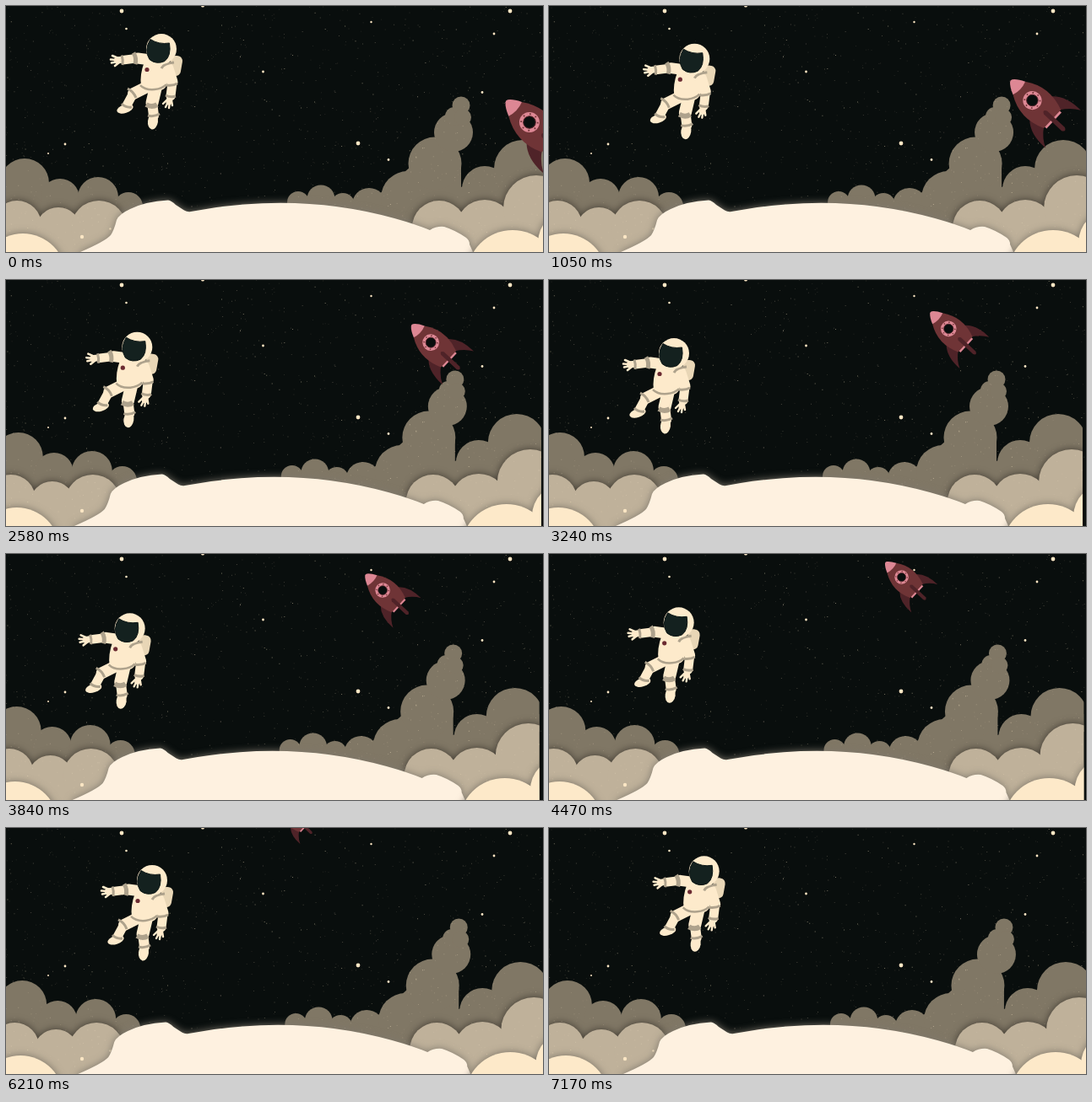
An HTML page for the animation above (7200 ms loop, 636x292 px).

```html
<!DOCTYPE html>
<html lang="en">
<head>
<meta charset="utf-8">
<title>Astronaut and rocket</title>
<style>
  html, body { margin: 0; width: 100%; height: 100%; overflow: hidden; background: #090e0d; }
  svg { display: block; width: 636px; height: 292px; }
  .back { fill: #807765; }
  .mid { fill: #bfb19a; filter: drop-shadow(0 0 5px #3f3a32); }
  .moon { fill: #fef1e0; filter: drop-shadow(0 0 5px #7d776c); }
  .front { fill: #fde9c9; filter: drop-shadow(0 0 5px #777064); }
  .suit { fill: #fdeacb; }
  .limb { fill: none; stroke: #fdeacb; stroke-linecap: round; stroke-linejoin: round; }
  .band { fill: none; stroke: #aea28c; stroke-width: 3; }
</style>
</head>
<body>
<svg viewBox="0 0 636 292">
  <clipPath id="edge"><rect x="-20" y="0" width="661" height="292"/></clipPath>
  <rect width="636" height="292" fill="#090e0d"/>

  <g class="drift" clip-path="url(#edge)">
    <g class="back" id="back">
      <path d="M-20 210H50L64 228H133L162 238V292H-20Z"/>
      <path d="M334 234H430L480 190H539V215L590 190H641V292H334Z"/>
    </g>
    <g class="mid" id="mid">
      <path d="M-20 259H38L62 266H140V292H-20Z"/>
      <path d="M482 265H600V240H660V292H482Z"/>
    </g>
  </g>

  <g id="stars" fill="#fbe6c4"></g>

  <g class="drift" clip-path="url(#edge)">
    <path class="moon" d="M88 292Q118 279 124 272Q128 266 131 254Q134 247 147 241Q165 232 192 230.5Q196 231 201 236L211 242.5Q215 245 219 244Q345 220 460 252Q485 259 502 266Q510 261 519 262Q532 266 545 275Q549 278 549 283L553 292V300H88Z"/>
    <g class="front" id="front"></g>
  </g>

  <g id="astronaut">
    <rect x="194" y="59" width="14" height="24" rx="6" fill="#e8d6b6" transform="rotate(10 201 71)"/>
    <!-- legs -->
    <path class="limb" stroke-width="14" d="M167 96L151 104"/>
    <path class="limb" stroke-width="11" d="M150 105L143 118"/>
    <ellipse class="suit" cx="141" cy="122" rx="10" ry="5" transform="rotate(-17 141 122)"/>
    <path class="limb" stroke-width="15" d="M177 98L173 115"/>
    <path class="limb" stroke-width="12" d="M173 114L175 130"/>
    <ellipse class="suit" cx="174" cy="137" rx="6" ry="9.5" transform="rotate(8 174 137)"/>
    <path class="band" d="M144 98Q151 101 154 109M137 116Q142 121 149 120M168 130Q175 132 182 128"/>
    <path class="band" stroke-width="6" style="stroke-width:6" d="M166 117Q173 121 179 117"/>
    <!-- raised arm -->
    <path class="limb" stroke-width="13" d="M171 64L156 62"/>
    <path class="limb" stroke-width="10.5" d="M156 62L140 64"/>
    <path class="limb" stroke-width="8" d="M135 64L132 64.5"/>
    <path class="limb" stroke-width="2.6" d="M133 62L126 59M131 64L124 63.5M132 66L125 67.5M134 67L129 71"/>
    <path class="band" d="M137 58.500Q139 64 138 70"/>
    <path class="band" style="stroke-width:5" d="M151 55.500Q155 62 153 69"/>
    <!-- lowered arm -->
    <path class="limb" stroke-width="13" d="M192 74L197 90"/>
    <path class="limb" stroke-width="11" d="M197 91L195 107"/>
    <path class="limb" stroke-width="7" d="M194 110L193 114"/>
    <path class="limb" stroke-width="2.4" d="M191 111L186 116M192 114L189 120M194 114L193 121M196 112L197 118"/>
    <path class="band" d="M190 94Q198 95 203 92M189 106Q195 109 201 107"/>
    <!-- torso -->
    <path class="suit" d="M164 66L192 64Q199 76 191 91Q190 101 176 101Q160 100 160 95Q158 82 164 66Z"/>
    <path class="band" style="stroke-width:2.500" d="M159 94Q165 100 176 99Q185 98 190 93"/>
    <path class="band" d="M184 74Q187 68 199 67"/>
    <circle cx="167" cy="75.500" r="2.600" fill="#6b2a31"/>
    <!-- helmet -->
    <circle class="suit" cx="184" cy="51" r="18"/>
    <path fill="#14211f" stroke="#0b1514" d="M171 39.500Q181 46 193.500 44Q196 59 188 65.500Q178 70 170 63.500Q163 52 171 39.500Z"/>
  </g>

  <g id="rocket">
    <g fill="#4f2328">
      <path id="fin" d="M20 14Q34 27 33 54Q27 42 15 34Z"/>
      <use href="#fin" transform="scale(-1 1)"/>
    </g>
    <path d="M-14 33H14V38H-14Z" fill="#dd8794"/>
    <path d="M-11.500 -23H11.500Q29 4 16 35H-16Q-29 4 -11.500 -23Z" fill="#6f3436"/>
    <path d="M-11.500 -23Q-7 -33 -2 -37Q0 -38.500 2 -37Q7 -33 11.500 -23Q0 -19 -11.500 -23Z" fill="#dd8794"/>
    <path d="M-3 23Q0 17 3 23L3 54Q0 60 -3 54Z" fill="#4f2328"/>
    <circle r="12" fill="#dd8794"/>
    <circle r="9.800" fill="none" stroke="#6f3436" stroke-width="1.800" stroke-dasharray="1.800 5.897"/>
    <circle r="7.300" fill="#090e0d" stroke="#4f2328"/>
  </g>
</svg>
<script>
const LOOP = 7200;
const byId = id => document.getElementById(id);

function addCircles(id, list) {
  byId(id).insertAdjacentHTML('beforeend',
    list.map(([x, y, r]) => `<circle cx="${x}" cy="${y}" r="${r}"/>`).join(''));
}

addCircles('back', [
  [22, 210, 29], [64, 228, 23], [109, 227, 24], [145, 238, 17],
  [346, 233, 13], [373, 229, 16.5], [399, 236, 14], [430, 236, 20], [476, 228, 32],
  [508, 187, 31.5], [530, 150, 23], [531, 131, 11], [539, 118, 10.5], [541, 132, 10],
  [567, 217, 27], [612, 193, 34]
]);
addCircles('mid', [
  [13, 260, 29], [62, 266, 27], [110, 264, 33],
  [513, 263, 32], [567, 264, 34], [628, 240, 39]
]);
addCircles('front', [[20, 321, 51], [600, 320, 54], [670, 281, 40]]);
addCircles('stars', [
  [137, 6, 2.4], [142.5, 27, 1.3], [233, -0.5, 2], [597, 6, 2.4], [578, 33, 1.4],
  [432.5, 19, 1.2], [304.5, 78, 1.4], [417, 163, 2.4], [453, 182.5, 1.4],
  [564, 102.5, 1.4], [70, 164, 1.4], [50, 175, 1], [90, 274, 2.2], [123.5, 264.5, 1.2]
]);

// Faint star dust, grouped by brightness
let seed = 7;
const random = () => (seed = seed * 16807 % 2147483647) / 2147483647;
for (const [count, size, opacity] of [[800, 0.8, 0.16], [380, 0.9, 0.28], [70, 1, 0.45]]) {
  let d = '';
  for (let i = 0; i < count; i++) {
    d += `M${(random() * 636).toFixed(1)} ${(random() * 292).toFixed(1)}h${size}v${size}h-${size}z`;
  }
  byId('stars').insertAdjacentHTML('beforeend', `<path d="${d}" opacity="${opacity}"/>`);
}

const layers = document.querySelectorAll('.drift');
const astronaut = byId('astronaut');
const rocket = byId('rocket');

function draw(now) {
  const t = now % LOOP / LOOP;
  const swing = 1 - Math.abs(1 - 2 * t);
  layers.forEach(layer => layer.setAttribute('transform', `translate(${-10 * swing} 0)`));
  astronaut.setAttribute('transform', `translate(${-40 * swing} ${40 * swing})`);
  rocket.setAttribute('transform',
    `translate(${620 - 326 * t} ${138 - 178 * t}) rotate(-47) scale(${1 - t / 2})`);
}

const start = performance.now();
function tick() {
  draw(performance.now() - start);
  requestAnimationFrame(tick);
}
tick();
</script>
</body>
</html>
```
